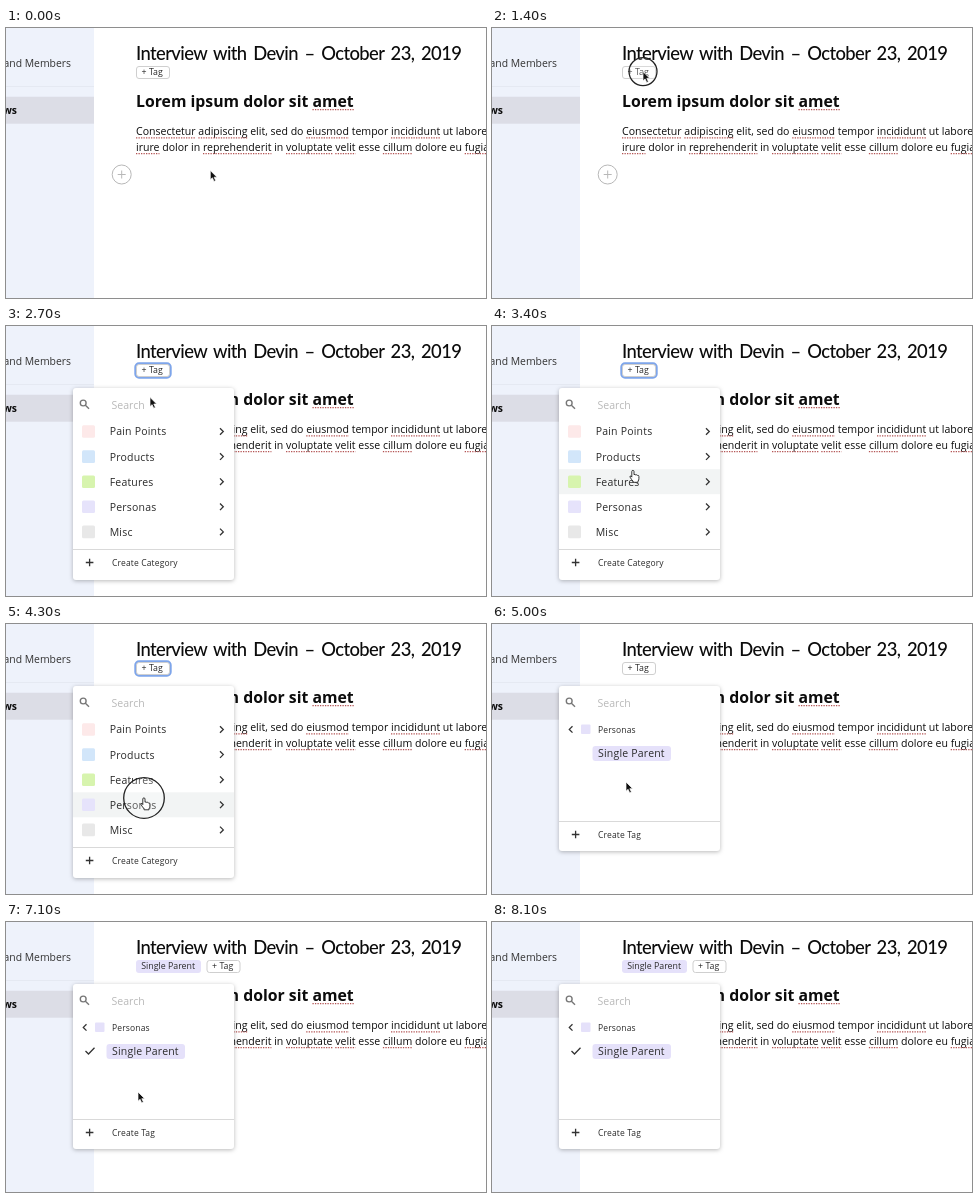
An HTML page for the animation above (8300 ms loop, 480 by 270 pixels).

```html
<!DOCTYPE html>
<html lang="en">
<head>
<meta charset="utf-8">
<title>Tagging an interview</title>
<style>
  html, body { margin: 0; width: 100%; height: 100%; overflow: hidden; background: #fff; }
  svg { display: block; width: 480px; height: 270px; }
  text { font-family: "Open Sans", sans-serif; fill: #0c0c0c; white-space: pre; }
  .title { font: 500 18.4px Lato, sans-serif; letter-spacing: -.6px; word-spacing: 2.6px; }
  .head { font-size: 15.8px; font-weight: 700; }
  .body { font-size: 10.55px; }
  .side { font-size: 10.4px; text-anchor: end; }
  .item { font-size: 10.5px; letter-spacing: .2px; fill: #2a2a2a; }
  .small { font-size: 8.5px; letter-spacing: .15px; fill: #2a2a2a; }
  .tag { font-size: 8.8px; fill: #2a2a2a; }
  .hint { font-size: 10.55px; fill: #b9b9b9; }
  .typo { stroke: #b45555; stroke-width: 1.2; stroke-dasharray: 1.3 1.2; }
  .line { fill: none; stroke: #333; stroke-width: 1.3; }
  .panel { fill: #fff; filter: drop-shadow(0 1px 2px rgba(0,0,0,.28)); }
</style>
</head>
<body>
<svg id="stage" viewBox="0 0 480 270">
  <rect width="480" height="270" fill="#fff"/>
  <rect width="88" height="270" fill="#eef2fb"/>
  <path d="M0 58.5h88" stroke="#e5e9f2"/>
  <rect y="68.7" width="88" height="27" fill="#dcdde6"/>
  <text class="side" x="65" y="38.5" style="fill:#333">and Members</text>
  <text class="side" x="11" y="86.3" font-weight="700">ws</text>

  <text class="title" x="130" y="32.1">Interview with Devin – October 23, 2019</text>
  <text class="head" x="130" y="79" data-typos="amet">Lorem ipsum dolor sit amet</text>
  <text class="body" x="130" y="107.3" data-typos="Consectetur adipiscing eiusmod incididunt">Consectetur adipiscing elit, sed do eiusmod tempor incididunt ut labore</text>
  <text class="body" x="130" y="123.1" data-typos="irure reprehenderit voluptate velit cillum fugiat">irure dolor in reprehenderit in voluptate velit esse cillum dolore eu fugiat</text>

  <g fill="none" stroke="#b8b8b8">
    <circle cx="115.7" cy="146.5" r="9.5"/>
    <path d="M111.7 146.5h8M115.7 142.5v8"/>
  </g>

  <g id="chip">
    <rect x="130" y="38" width="65" height="13" rx="3" fill="#e5e1fa"/>
    <text class="tag" x="135.3" y="47.4">Single Parent</text>
  </g>
  <g id="add">
    <rect id="ring" x="129.5" y="37.5" width="35" height="14" rx="3.5" fill="none" stroke="#7ea5ea" stroke-width="2.4"/>
    <rect x="130.5" y="38.5" width="33" height="12" rx="2.5" fill="#fff" stroke="#cfcfcf"/>
    <text class="tag" x="135.6" y="47.4">+ Tag</text>
  </g>

  <g id="menu">
    <rect id="panel" class="panel" x="67" y="62" width="161" height="192" rx="3"/>
    <rect id="hover" x="67" width="161" height="25" fill="#f2f4f4"/>
    <g fill="none" stroke="#777" stroke-width="1.4">
      <circle cx="77.2" cy="77" r="2.9"/><path d="M79.4 79.2l3.6 3.6"/>
    </g>
    <text class="hint" x="105.5" y="83">Search</text>
    <g id="groups"></g>
    <g id="tags">
      <path class="line" d="M80.5 102.2l-3.2 3.2 3.2 3.2"/>
      <rect x="89" y="100.5" width="9.5" height="9.5" rx="1" fill="#e5e1fa"/>
      <text class="small" x="106" y="108.6">Personas</text>
      <path id="check" class="line" d="M79.5 129l3 3 6-6.3"/>
      <rect x="100.5" y="122" width="78.5" height="15" rx="3" fill="#e5e1fa"/>
      <text class="item" x="106" y="133.2">Single Parent</text>
    </g>
    <g id="foot">
      <path d="M67 .5h161" stroke="#d9d9d9"/>
      <path class="line" d="M79.8 13.5h7.6M83.6 9.7v7.6"/>
      <text id="create" class="small" x="106" y="16.7"></text>
    </g>
  </g>

  <circle id="press" fill="#fff" fill-opacity=".22" stroke="#222" stroke-width="1.3"/>
  <g id="cursor">
    <path id="arrow" d="M0 0v9.2l2.1-1.9 1.6 3.6 1.7-.8-1.6-3.4h2.9z" fill="#111" stroke="#fff" stroke-width=".7"/>
    <path id="hand" d="M-1.2 6.6V1a1.1 1.1 0 0 1 2.2 0v3.2q1.1-.9 1.8.3 1.2-.7 1.7.4 1.4-.3 1.4 1v2.3q0 1.4-.9 2.4v1.2h-4.9v-1.1q-1.6-1.5-3-4-.5-1.6.7-1.2z" fill="#fff" stroke="#222" stroke-width=".9" stroke-linejoin="round"/>
  </g>
</svg>
<script>
const LOOP = 8300, STEP = 100;
const $ = id => document.getElementById(id);
const show = (id, on) => $(id).setAttribute("visibility", on ? "inherit" : "hidden");
const set = (id, attrs) => { for (const k in attrs) $(id).setAttribute(k, attrs[k]); };
const within = (t, a, b) => t >= a && t < b;

const groups = [
  ["Pain Points", "#fde9e9"], ["Products", "#d2e6fa"], ["Features", "#d7f4ae"],
  ["Personas", "#e6e3fb"], ["Misc", "#e8e8e8"]
];
$("groups").innerHTML = groups.map(([name, color], i) => {
  const y = 105.5 + 25.1 * i;
  return `<rect x="76" y="${y - 6.3}" width="13" height="12.6" rx="1.5" fill="${color}"/>
    <text class="item" x="103.7" y="${y + 3.9}">${name}</text>
    <path class="line" d="M214 ${y - 3.3}l3.3 3.3-3.3 3.3"/>`;
}).join("");

// Dotted marks under misspelled words
for (const text of document.querySelectorAll("[data-typos]")) {
  const y = +text.getAttribute("y") + 2.6;
  for (const word of text.dataset.typos.split(" ")) {
    const at = text.textContent.indexOf(word);
    const x1 = text.getStartPositionOfChar(at).x;
    const x2 = text.getEndPositionOfChar(at + word.length - 1).x;
    text.insertAdjacentHTML("afterend", `<path class="typo" d="M${x1} ${y}H${x2}"/>`);
  }
}

// Pointer path: time, x, y
const path = [
  [0, 204.3, 142.5], [200, 190, 106], [300, 190, 106], [1100, 151, 43.6], [1400, 151, 43.6],
  [2200, 144.5, 43], [2400, 144.5, 43], [3300, 143, 128], [3400, 141, 144.5], [4200, 138, 174],
  [4700, 138, 174], [5000, 134, 158], [5600, 135, 127], [6900, 135, 127], [7500, 126, 256]
];
function pointer(t) {
  const i = path.findIndex(p => p[0] > t);
  if (i < 0) return path[path.length - 1].slice(1);
  const [t0, x0, y0] = path[i - 1], [t1, x1, y1] = path[i];
  const k = (t - t0) / (t1 - t0);
  return [x0 + (x1 - x0) * k, y0 + (y1 - y0) * k];
}

function draw(t) {
  const [x, y] = pointer(t);
  const open = t >= 2300, inside = t >= 4500, tagged = t >= 5900;
  const onGroup = open && !inside && within(y, 93, 218);
  const onTag = inside && within(y, 117, 142);

  show("menu", open);
  show("groups", open && !inside);
  show("tags", inside);
  show("check", tagged);
  show("hover", onGroup || (onTag && t < 6100));
  set("hover", { y: onGroup ? 93 + 25.1 * Math.floor((y - 93) / 25.1) : 117 });
  set("panel", { height: inside ? 165 : 192 });
  set("foot", { transform: `translate(0 ${inside ? 197 : 223})` });
  $("create").textContent = inside ? "Create Tag" : "Create Category";

  show("chip", tagged);
  show("ring", within(t, 1500, 4400));
  set("add", { transform: `translate(${tagged ? 70.5 : 0} 0)` });

  show("press", within(t, 1400, 2300) || within(t, 4300, 4500) || within(t, 5700, 5900));
  set("press", { cx: x, cy: y, r: within(t, 1400, 1500) ? 14 : 20.3 });

  const hand = within(t, 1500, 2500) || onGroup || onTag;
  show("cursor", t < 7600);
  show("hand", hand && t < 7600);
  show("arrow", !hand && t < 7600);
  set("cursor", { transform: `translate(${x} ${y})` });
}

const start = performance.now();
function tick() {
  const t = (performance.now() - start) % LOOP;
  draw(Math.floor(t / STEP) * STEP);
  requestAnimationFrame(tick);
}
tick();
</script>
</body>
</html>
```
